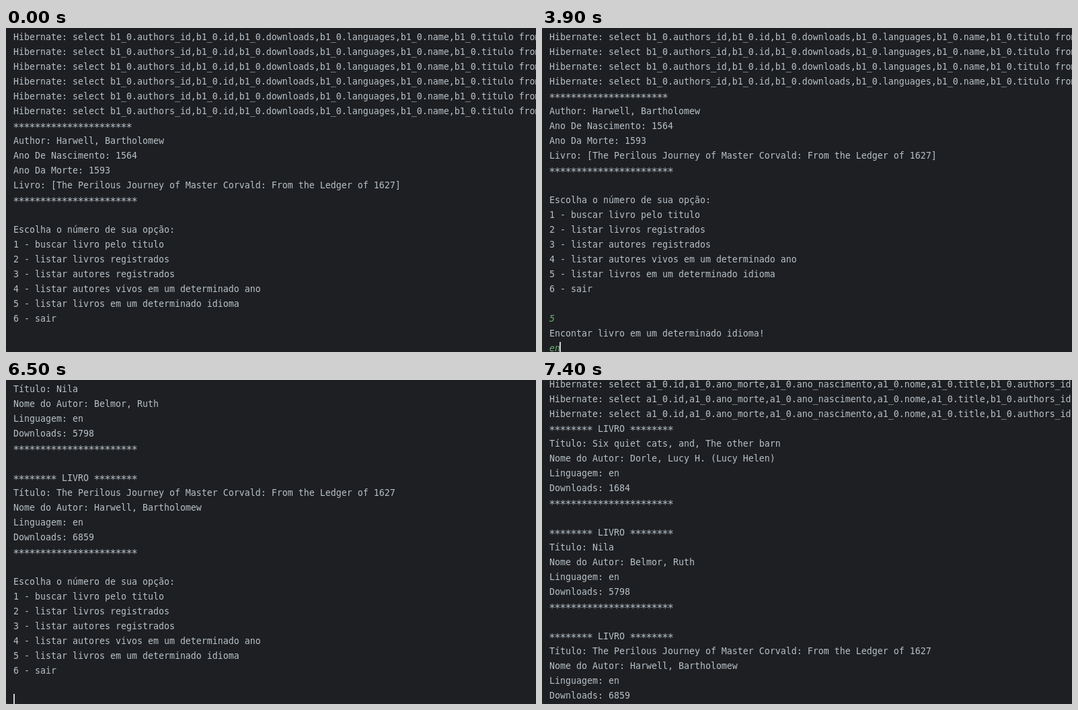
Write an HTML page with a canvas that moves like this. It is 788x481 px and loops after 8000 ms.

```html
<!DOCTYPE html>
<html lang="pt">
<head>
<meta charset="utf-8">
<style>
html, body { margin: 0; width: 100%; height: 100%; overflow: hidden; background: #1e1f22; }
canvas { display: block; }
</style>
</head>
<body>
<canvas width="788" height="481"></canvas>
<script>
const ctx = document.querySelector('canvas').getContext('2d');
const LOOP = 8000, TICK = 100;
const PITCH = 22, CHAR = 8, LEFT = 11, LAST_ROW = 21;
const FAMILY = '"DejaVu Sans Mono", monospace';

const stars = n => '*'.repeat(n);
const repeat = (n, line) => Array(n).fill(line);
const author = 'Harwell, Bartholomew';
const title = 'The Perilous Journey of Master Corvald: From the Ledger of 1627';

const bookQuery = ids => `Hibernate: select ${ids},b1_0.downloads,b1_0.languages,b1_0.name,b1_0.titulo from`;
const authorQuery = 'Hibernate: select a1_0.id,a1_0.ano_morte,a1_0.ano_nascimento,a1_0.nome,a1_0.title,b1_0.authors_id';

const menu = [
  '', 'Escolha o número de sua opção:',
  '1 - buscar livro pelo titulo',
  '2 - listar livros registrados',
  '3 - listar autores registrados',
  '4 - listar autores vivos em um determinado ano',
  '5 - listar livros em um determinado idioma',
  '6 - sair', ''
];
const book = (name, writer, downloads) => [
  `${stars(8)} LIVRO ${stars(8)}`, `Título: ${name}`, `Nome do Autor: ${writer}`,
  'Linguagem: en', `Downloads: ${downloads}`, stars(23)
];

const greeting = [
  ...repeat(6, bookQuery('b1_0.authors_id,b1_0.id')),
  stars(22), `Author: ${author}`, 'Ano De Nascimento: 1564', 'Ano Da Morte: 1593',
  `Livro: [${title}]`, stars(23), ...menu
];
const queries = [bookQuery('b1_0.id,b1_0.authors_id'), ...repeat(4, authorQuery)];
const results = [
  ...book('Six quiet cats, and, The other barn', 'Dorle, Lucy H. (Lucy Helen)', 1684), '',
  ...book('Nila', 'Belmor, Ruth', 5798), '',
  ...book(title, author, 6859), ...menu
];

// what the user and the program do; every entry also restarts the caret blink
const session = [
  { at: 500, click: { row: 14, col: 28 } },
  { at: 1200, key: '5' },
  { at: 2100, enter: true, print: ['Encontar livro em um determinado idioma!'] },
  { at: 3700, key: 'e' },
  { at: 3800, key: 'n' },
  { at: 4200, enter: true },
  { at: 4400, print: queries },
  { at: 4500 - 1, print: results, quiet: true },
  { at: 6500 }
];

const ease = p => (1 - Math.cos(Math.PI * Math.min(1, Math.max(0, p)))) / 2;
const wheel = (time, start, span, distance) => distance * ease((time - start) / span);

function replay(time) {
  const lines = greeting.map(text => ({ text }));
  let input = '', caret = null, active = 0;
  for (const step of session) {
    if (step.at > time) break;
    if (step.enter) {
      lines.push({ text: input, typed: true });
      input = '';
    }
    input += step.key || '';
    lines.push(...(step.print || []).map(text => ({ text })));
    caret = step.click || { row: lines.length, col: input.length };
    if (!step.quiet) active = step.at;
  }
  const scroll = (lines.length - LAST_ROW) * PITCH
    + wheel(time, 6500, 500, -318) + wheel(time, 7200, 200, 83);
  lines.push({ text: input, typed: true });
  const idle = time - active;
  const lit = idle < 700 || Math.floor((idle - 700) / 500) % 2 === 1;
  return { lines, scroll: Math.round(scroll), caret: lit && caret };
}

function drawLine({ text, typed }, y) {
  ctx.font = `${typed ? 'italic ' : ''}13.29px ${FAMILY}`;
  ctx.fillStyle = typed ? '#6aab73' : '#b6c1c9';
  ctx.textAlign = 'left';
  ctx.fillText(text.replace(/\*/g, ' '), LEFT, y);
  // asterisks are larger and sit in the middle of the line
  ctx.font = `16px ${FAMILY}`;
  ctx.textAlign = 'center';
  for (const { index } of text.matchAll(/\*/g)) {
    ctx.fillText('*', LEFT + (index + 0.5) * CHAR, y + 3);
  }
}

function draw(time) {
  const { lines, scroll, caret } = replay(time);
  ctx.fillStyle = '#1e1f22';
  ctx.fillRect(0, 0, 788, 481);
  lines.forEach((line, i) => drawLine(line, 18 + i * PITCH - scroll));
  if (caret) {
    ctx.fillStyle = '#ced0d6';
    ctx.fillRect(Math.max(LEFT, LEFT - 1 + caret.col * CHAR), 4 + caret.row * PITCH - scroll, 2, 18);
  }
  // rounded window corner
  ctx.fillStyle = '#2b2d30';
  ctx.beginPath();
  ctx.moveTo(0, 476);
  ctx.quadraticCurveTo(0, 481, 5, 481);
  ctx.lineTo(0, 481);
  ctx.fill();
}

function frame() {
  const time = performance.now() % LOOP;
  draw(Math.floor(time / TICK) * TICK);
  requestAnimationFrame(frame);
}
frame();
</script>
</body>
</html>
```
